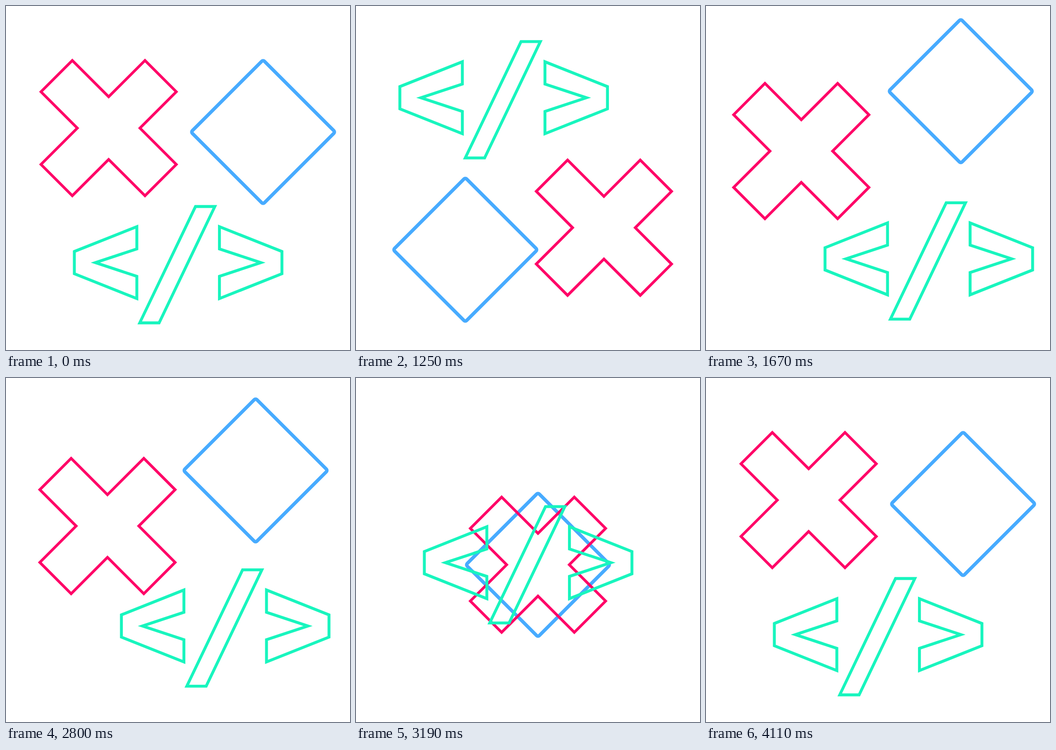
These frames come from a looping animation (748x748 px, 6280 ms). An HTML page:

```html
<!DOCTYPE html>
<html lang="en">
<head>
<meta charset="utf-8">
<title>Moving outlines</title>
<style>
  html, body { margin: 0; width: 100%; height: 100%; overflow: hidden; background: #fff; }
  svg { display: block; width: 100%; height: 100%; }
  g { fill: none; stroke-miterlimit: 10; }
  #diamond { stroke: #47abff; stroke-width: 7.5; }
  #cross { stroke: #ff0067; stroke-width: 5.9; }
  #code { stroke: #18f5be; stroke-width: 6.3; }
</style>
</head>
<body>
<svg viewBox="0 0 748 748">
  <g id="diamond">
    <rect x="-110.8" y="-110.8" width="221.6" height="221.6" rx="4" transform="rotate(45)"/>
  </g>
  <g id="cross"><path transform="rotate(45)"/></g>
  <g id="code">
    <path id="bracket" d="M-225.7-24.2-89.8-78.2V-29.8L-180 0-89.8 29.8V78.2L-225.7 24.2Z"/>
    <use href="#bracket" transform="scale(-1 1)"/>
    <path d="M37.8-122H79.8L-41.4 131H-83.5Z"/>
  </g>
</svg>
<script>
const LOOP = 6280;
const STEP = 30;

// Four resting centres per shape; the last one leads back to the first.
const stops = {
  diamond: [[559, 274], [215.1, 554.6], [554, 185.2], [395.7, 406.2]],
  cross: [[223.2, 265.5], [562.8, 494], [207.2, 315.4], [395.7, 406]],
  code: [[374.3, 558], [309.4, 174.4], [484.5, 549.8], [374.3, 401.6]]
};
const moves = [
  { start: 330, steps: 16 },
  { start: 1250, steps: 15 },
  { start: 2800, steps: 14 },
  { start: 3660, steps: 16 }
];

// A plus sign: the same arm repeated at each quarter turn.
function plusPath(half, reach) {
  const points = [];
  let arm = [[-half, -half], [-half, -reach], [half, -reach]];
  for (let i = 0; i < 4; i++) {
    points.push(...arm);
    arm = arm.map(([x, y]) => [-y, x]);
  }
  return `M${points.join(' ')}Z`;
}

// Number of moves completed, with the current one as a fraction.
function progress(t) {
  return moves.reduce((sum, { start, steps }) => {
    const done = Math.floor((t - start) / STEP) + 1;
    return sum + Math.min(Math.max(done / steps, 0), 1);
  }, 0);
}

function draw(t) {
  const p = progress(t);
  const leg = Math.floor(p);
  for (const [id, path] of Object.entries(stops)) {
    const from = path[leg % 4];
    const to = path[(leg + 1) % 4];
    const [x, y] = from.map((v, i) => v + (to[i] - v) * (p - leg));
    document.getElementById(id).setAttribute('transform', `translate(${x} ${y})`);
  }
}

document.querySelector('#cross path').setAttribute('d', plusPath(48.15, 159.9));

const begin = performance.now();
function tick() {
  draw((performance.now() - begin) % LOOP);
  requestAnimationFrame(tick);
}
tick();
</script>
</body>
</html>
```
